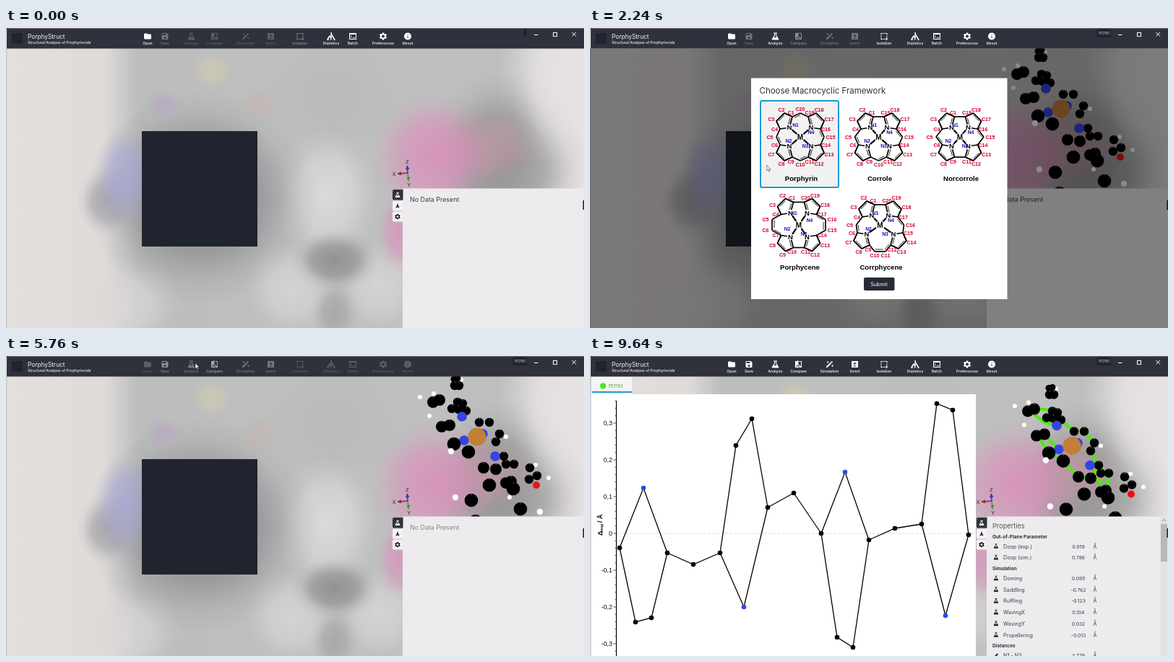
An HTML page with a canvas that plays this animation: 800 px wide and 416 px high, repeating every 9.68 s.

```html
<!DOCTYPE html>
<html lang="en">
<head>
<meta charset="utf-8">
<title>PorphyStruct</title>
<style>
html, body { margin: 0; width: 100%; height: 100%; overflow: hidden; background: #bbb; }
canvas { display: block; }
</style>
</head>
<body>
<canvas id="stage" width="800" height="416"></canvas>
<script>
const ctx = document.getElementById('stage').getContext('2d');
const LOOP = 9680;
const LOADED = 1900, PICKED = 3240, CLOSED = 4680, BUSY = 5640, DONE = 6240;
const UI = 'Inter, sans-serif', ARIAL = '"Liberation Sans", Arial, sans-serif';
const NAVY = '#20242e', BAR = '#2f323c', PANEL = '#edebee', INK = '#3c3d42';

function rect(x, y, w, h, color, radius = 0) {
  ctx.fillStyle = color;
  ctx.beginPath();
  ctx.roundRect(x, y, w, h, radius);
  ctx.fill();
}

function disc(x, y, r, color) {
  ctx.fillStyle = color;
  ctx.beginPath();
  ctx.arc(x, y, r, 0, Math.PI * 2);
  ctx.fill();
}

function line(points, color, width) {
  ctx.strokeStyle = color;
  ctx.lineWidth = width;
  ctx.beginPath();
  points.forEach(([x, y]) => ctx.lineTo(x, y));
  ctx.stroke();
}

function text(str, x, y, size, color, { weight = 400, align = 'left', family = UI } = {}) {
  ctx.font = `${weight} ${size}px ${family}`;
  ctx.textAlign = align;
  ctx.textBaseline = 'alphabetic';
  ctx.fillStyle = color;
  ctx.fillText(str, x, y);
}

// Icons live on a 24-unit grid.
const ICONS = {
  folder: 'M10 4H4L2 6V18L4 20H20L22 18V8L20 6H12Z',
  save: 'M17 3H5L3 5V19L5 21H19L21 19V7ZM12 13A3 3 0 1 0 12 19A3 3 0 1 0 12 13ZM5 5V9H15V5Z',
  flask: 'M7 2H17V4H15V9L22 20L20 22H4L2 20L9 9V4H7ZM11 4V10L8 15H16L13 10V4Z',
  compare: 'M10 3H3V21H10V23H12V1H10ZM10 18H5L10 12ZM14 3H21V21H14V12L19 18V5H14Z',
  wand: 'M2 19L14 7L17 10L5 22ZM15 6L18 3L21 6L18 9ZM7 2L8 5L11 6L8 7L7 10L6 7L3 6L6 5ZM20 12L21 15L24 16L21 17L20 20L19 17L16 16L19 15Z',
  invert: 'M3 3H21V21H3ZM11 6V9H8V11H11V14H13V11H16V9H13V6ZM8 16V18H16V16Z',
  isolate: 'M3 3H8V5H5V8H3ZM10 3H14V5H10ZM16 3H21V8H19V5H16ZM3 10H5V14H3ZM19 10H21V14H19ZM3 16H5V19H8V21H3ZM10 19H14V21H10ZM18 15H20V18H23V20H20V23H18V20H15V18H18Z',
  stats: 'M11 1H14V6L23 20V23H19V20L15 13L13 16V22H10V15L8 14L5 20V23H1V19L7 10H10L11 6ZM12 8L11 12L14 11Z',
  batch: 'M2 3H22V21H2ZM4 7V19H20V7ZM6 9L10 13L6 17L5 16L8 13L5 10ZM12 15H18V17H12Z',
  gear: 'M10 2H14L15 5L17 6L20 5L22 9L20 11V13L22 15L20 19L17 18L15 19L14 22H10L9 19L7 18L4 19L2 15L4 13V11L2 9L4 5L7 6L9 5ZM12 8A4 4 0 1 0 12 16A4 4 0 1 0 12 8Z',
  info: 'M12 2A10 10 0 1 0 12 22A10 10 0 1 0 12 2ZM11 7H13V9H11ZM11 11H13V17H11Z',
  needle: 'M12 2L20 22L12 18L4 22Z',
  pencil: 'M3 18L17 4L21 8L7 22H3Z'
};
for (const key in ICONS) ICONS[key] = new Path2D(ICONS[key]);

function icon(name, x, y, size, color) {
  ctx.save();
  ctx.translate(x - size / 2, y - size / 2);
  ctx.scale(size / 24, size / 24);
  ctx.fillStyle = color;
  ctx.fill(ICONS[name], 'evenodd');
  ctx.restore();
}

// Soft patches: centre, radii, colour.
const BLOBS = [
  [450, 95, 110, 100, '184,186,186'], [445, 232, 72, 95, '224,222,223'],
  [270, 235, 160, 150, '130,129,133'], [142, 240, 45, 50, '160,159,165'],
  [165, 205, 45, 70, '168,168,212'], [285, 58, 30, 28, '207,201,178'],
  [218, 108, 25, 24, '184,170,196'], [350, 108, 30, 25, '194,182,176'],
  [160, 385, 85, 70, '220,217,216'],
  [395, 362, 65, 65, '216,214,215'], [518, 358, 60, 65, '216,214,215'],
  [455, 322, 60, 42, '138,137,138'], [455, 396, 32, 45, '165,164,165'],
  [690, 185, 115, 125, '138,138,138'], [775, 75, 75, 135, '230,227,226'],
  [665, 165, 75, 55, '188,152,164'], [590, 178, 88, 90, '220,142,188'],
  [545, 282, 32, 58, '214,150,188']
];

function backdrop() {
  const base = ctx.createLinearGradient(0, 0, 800, 0);
  [[0, '#e3dfdd'], [.17, '#dfdbd9'], [.23, '#bbbcbc'], [.5, '#bfc0c0'],
   [.85, '#bebebe'], [.92, '#dad8d7'], [1, '#e6e3e2']].forEach(([p, c]) => base.addColorStop(p, c));
  ctx.fillStyle = base;
  ctx.fillRect(0, 0, 800, 416);
  for (const [x, y, rx, ry, rgb] of BLOBS) {
    ctx.save();
    ctx.translate(x, y);
    ctx.scale(rx, ry);
    const g = ctx.createRadialGradient(0, 0, 0, 0, 0, 1);
    g.addColorStop(0, `rgba(${rgb},.85)`);
    g.addColorStop(.5, `rgba(${rgb},.58)`);
    g.addColorStop(.8, `rgba(${rgb},.14)`);
    g.addColorStop(1, `rgba(${rgb},0)`);
    ctx.fillStyle = g;
    ctx.fillRect(-1, -1, 2, 2);
    ctx.restore();
  }
}

const TOOLS = [
  ['Open', 'folder', 196], ['Save', 'save', 220], ['Analyze', 'flask', 256.5],
  ['Compare', 'compare', 288.5], ['Simulation', 'wand', 331.5], ['Invert', 'invert', 366.5],
  ['Isolation', 'isolate', 407], ['Statistics', 'stats', 450], ['Batch', 'batch', 480],
  ['Preferences', 'gear', 522], ['About', 'info', 556]
];

// One digit per tool: its brightness out of nine.
function toolLevels(t) {
  if (t < LOADED) return '93222249999';
  if (t < BUSY) return '93943399999';
  return t < DONE ? '24353322222' : '99999999999';
}

function titleBar(t) {
  rect(0, 0, 800, 1, '#777074');
  rect(1, 1, 799, 27.5, BAR);
  rect(8, 7, 15, 15, NAVY);
  text('PorphyStruct', 30, 15, 8.3, '#f4f4f6');
  text('Structural Analysis of Porphyrinoids', 30, 21.5, 5.1, '#f4f4f6', { weight: 500 });
  const levels = toolLevels(t);
  TOOLS.forEach(([label, name, x], i) => {
    ctx.globalAlpha = levels[i] / 9;
    icon(name, x, 11.5, 12, '#fff');
    text(label, x, 22.5, 5.2, '#fff', { weight: 500, align: 'center' });
  });
  ctx.globalAlpha = 1;
  if (t < LOADED) rect(716, 1, 5, 11, NAVY);
  else {
    rect(701, 1, 20, 12, NAVY, 1);
    text('751761', 711, 9.2, 5, '#e4e4e8', { align: 'center' });
  }
  line([[731, 9.5], [736.5, 9.5]], '#fff', 1);
  ctx.strokeRect(757.5, 6.5, 5, 5);
  line([[783.5, 6], [789, 11.5]], '#fff', 1);
  line([[789, 6], [783.5, 11.5]], '#fff', 1);
}

function axes() {
  const arm = (x, y, color) => {
    line([[556, 201], [x, y]], color, 1.5);
    ctx.save();
    ctx.translate(x, y);
    ctx.rotate(Math.atan2(y - 201, x - 556));
    ctx.fillStyle = color;
    ctx.beginPath();
    ctx.moveTo(3, 0); ctx.lineTo(-3, -2.6); ctx.lineTo(-3, 2.6);
    ctx.fill();
    ctx.restore();
  };
  arm(544, 202, '#7d3030');
  arm(557, 210, '#38a038');
  arm(555.5, 193, '#2838b8');
  const label = (s, x, y) => text(s, x, y, 7, '#222', { align: 'center', family: ARIAL });
  label('Z', 555.5, 188);
  label('X', 537, 205);
  label('Y', 557.5, 220);
}

// Atom groups: colour, radius, positions.
const ATOMS = [
  ['#fff', 3, [[573, 57], [586, 83], [592, 52], [692, 112], [733, 151], [751, 169], [697, 196], [630, 33]]],
  ['#000', 4.5, [[620, 32], [625, 31]]],
  ['#000', 6.2, [[621, 41], [627, 41], [625, 64], [632, 66], [617, 73], [626, 74], [637, 76], [655, 92],
    [669, 92], [683, 108], [678, 119], [689, 139], [692, 150], [703, 150], [725, 155], [735, 166], [724, 171]]],
  ['#3345e4', 6.8, [[631, 84], [660, 108], [634, 117], [677, 139]]],
  ['#000', 8, [[600, 61], [591, 64], [603, 98], [614, 96], [661, 155], [678, 157], [692, 176], [699, 174]]],
  ['#c47f36', 12.5, [[652, 112]]],
  ['#000', 9.3, [[620, 122], [640, 133], [669, 179], [702, 184], [644, 200], [650, 229], [712, 212]]],
  ['#ee1014', 5, [[734, 179]]],
  ['#fff', 4.2, [[616, 132], [622, 196], [739, 216]]]
];
const RING = [
  [[594, 62], [602, 60], [625, 63]], [[597, 66], [613, 79], [625, 83]], [[634, 76], [655, 90], [669, 92], [683, 109],
   [678, 120], [689, 139], [703, 153], [700, 172]], [[604, 96], [619, 121], [640, 133], [661, 155], [689, 159], [702, 184]],
  [[614, 96], [633, 117]], [[689, 139], [678, 157]]
];

function molecule(analyzed) {
  ctx.save();
  if (analyzed) ctx.translate(15, 12.5);
  const metal = [652, 112];
  ATOMS[3][2].forEach(n => line([metal, n], '#b8aaa0', .8));
  if (analyzed) RING.forEach(path => line(path, '#48ee08', 4));
  for (const [color, r, spots] of ATOMS) {
    for (const [x, y] of spots) {
      disc(x, y, r, color);
      if (color === '#000' && r > 6) line([[x, y - r], [x + .5, y - r + 2.5]], '#999', .6);
    }
  }
  ctx.restore();
}

const SECTIONS = [
  [253, 'Out-of-Plane Parameter', ['Doop (exp.)', '0.919', 'Doop (sim.)', '0.786'], 266.5],
  [297, 'Simulation', ['Doming', '0.095', 'Saddling', '-0.762', 'Ruffling', '-0.123', 'WavingX', '0.104',
    'WavingY', '0.032', 'Propellering', '-0.013'], 311],
  [404, 'Distances', ['N1 - N3', '3.779'], 418]
];

function sidePanel(t) {
  rect(549, 222.5, 251, 200, PANEL, 3);
  rect(535, 224, 14.5, 14.5, '#30333d', [2, 0, 0, 2]);
  rect(535, 239.5, 14, 14, '#f4f3f5', [2, 0, 0, 2]);
  rect(535, 254.5, 14, 14, '#f4f3f5', [2, 0, 0, 2]);
  icon('flask', 542, 231.5, 8.5, '#fff');
  icon('needle', 542, 246.5, 8, '#222');
  icon('gear', 542, 261.5, 9, '#222');
  if (t < DONE) {
    text('No Data Present', 559, 241.3, 8.9, t < BUSY ? INK : '#85858a');
    return;
  }
  text('Properties', 557, 239, 9.2, '#55565b');
  for (const [y, title, rows, first] of SECTIONS) {
    text(title, 557, y, 6.5, '#2c2d31', { weight: 700 });
    for (let i = 0; i < rows.length; i += 2) {
      const base = first + i * 7.85;
      icon(rows[i][0] === 'N' ? 'pencil' : 'flask', 562, base - 3, 8, '#222');
      text(rows[i], 572, base, 7.2, INK);
      text(rows[i + 1], 676, base, 6.8, INK, { align: 'center' });
      text('Å', 696.5, base, 7, INK);
    }
  }
  rect(789.5, 223, 10, 193, '#e2e1e4');
  rect(790, 233, 9, 52, '#b8b7ba');
  line([[792, 229], [794.5, 226.5], [797, 229]], '#777', 1);
}

// Each ring: shared ends, the black outer pair and the blue nitrogen.
const CURVE = [
  { from: [41, 266], pair: [[63, 369], [85, 363]], n: [74, 183], to: [107, 273], meso: [143, 289] },
  { from: [180, 273], pair: [[202, 124], [224, 87]], n: [213, 348], to: [246, 210], meso: [282, 190] },
  { from: [320, 246], pair: [[342, 390], [364, 404]], n: [353, 161], to: [386, 255], meso: [422, 239] },
  { from: [459, 233], pair: [[480, 66], [502, 75]], n: [492, 360], to: [524, 248] }
];

function chart() {
  rect(1, 53, 533, 363, '#fff');
  rect(2, 29, 56, 24, '#f4f4f4');
  rect(3, 49, 55, 2, '#2196c8');
  disc(18, 41.5, 4, '#44e818');
  text('751761', 25, 44, 6.5, '#569548');
  ctx.setLineDash([4, 2]);
  line([[37, 246], [534, 246]], '#dcdcdc', 1);
  ctx.setLineDash([]);
  line([[36.5, 62], [36.5, 416]], '#000', 1.2);
  for (let i = -16; i <= 18; i++) {
    const y = 246 - i * 10.2;
    line([[i % 5 ? 34.5 : 32.5, y], [36.5, y]], '#222', .8);
    if (i % 5 === 0) {
      const label = i ? (i / 50).toFixed(1).replace('.', ',') : '0';
      text(label, 31, y + 3, 9, '#111', { align: 'right', family: ARIAL });
    }
  }
  ctx.save();
  ctx.translate(16.5, 249);
  ctx.rotate(-Math.PI / 2);
  text('Δ', 0, 0, 9, '#000', { weight: 700, family: ARIAL });
  text('msp', 6, 1.5, 5, '#000', { weight: 700, family: ARIAL });
  text('/ Å', 18, 0, 9, '#000', { weight: 700, family: ARIAL });
  ctx.restore();
  CURVE.forEach(({ from, pair, n, to, meso }, i) => {
    line([from, ...pair, to], '#000', 1.3);
    line([from, n, to], '#000', 1.3);
    if (meso) line([to, meso, CURVE[i + 1].from], '#000', 1.3);
  });
  for (const { from, pair, n, to, meso } of CURVE) {
    [from, ...pair, to, meso].forEach(p => p && disc(p[0], p[1], 3.3, '#000'));
    disc(n[0], n[1], 3.3, '#3048e0');
  }
}

// Bridges count the carbons between rings: top, left, bottom, right.
const FRAMEWORKS = [
  { name: 'Porphyrin', x: 291, y: 151, bridges: [1, 1, 1, 1] },
  { name: 'Corrole', x: 399.5, y: 151, bridges: [0, 1, 1, 1] },
  { name: 'Norcorrole', x: 512, y: 151, bridges: [0, 1, 0, 1], skip: 10 },
  { name: 'Porphycene', x: 289, y: 273, bridges: [0, 2, 0, 2] },
  { name: 'Corrphycene', x: 401.5, y: 273, bridges: [0, 1, 2, 1] }
];
const SIDES = [[0, -1], [-1, 0], [0, 1], [1, 0]];
const CORNERS = [[-1, -1], [-1, 1], [1, 1], [1, -1]];
const RING_ATOMS = [[11, 28], [22, 33], [33, 22], [28, 11]];
const LABEL_SHIFT = [[2, 6], [4, 4.5], [7, 2.5], [7.5, 0]];
const N_LABELS = [[-6.5, -16], [-16, 6], [7, 13], [15, -6]];

function label(str, x, y, size, color) {
  text(str, x, y + size * .36, size, color, { weight: 700, align: 'center', family: ARIAL });
}

function innerBond(a, b, c) {
  const shrink = p => [p[0] + (c[0] - p[0]) * .27, p[1] + (c[1] - p[1]) * .27];
  line([shrink(a), shrink(b)], '#111', .9);
}

function framework({ name, x, y, bridges, skip }, fill) {
  ctx.save();
  ctx.translate(x, y);
  ctx.lineJoin = 'round';
  const marks = [], outline = [], nitrogens = [];
  const shift = count => (count - 1) * 3.5;
  let number = 1;
  const mark = (px, py) => {
    if (number === skip) number++;
    marks.push(['C' + number++, px, py]);
  };
  CORNERS.forEach(([sx, sy], q) => {
    const odd = q % 2;
    const dx = shift(bridges[q === 2 || q === 1 ? 2 : 0]);
    const dy = shift(bridges[q < 2 ? 1 : 3]);
    const place = ([a, b]) => [sx * (a + dx), sy * (b + dy)];
    const local = RING_ATOMS.map(place);
    const atoms = odd ? local.slice().reverse() : local;
    const n = place([15, 13]), mid = place([22, 22]);
    line([...atoms, n, atoms[0]], '#000', 1.7);
    innerBond(atoms[1], atoms[2], mid);
    innerBond(odd ? atoms[3] : atoms[0], n, mid);
    line([[n[0] * .3, n[1] * .3], n], '#000', 2.2);
    nitrogens.push(n);
    atoms.forEach(([px, py], i) => {
      const [lx, ly] = LABEL_SHIFT[odd ? 3 - i : i];
      mark(px + sx * lx, py + sy * ly);
    });
    outline.push(atoms);
    const [ux, uy] = SIDES[(q + 1) % 4];
    const count = bridges[(q + 1) % 4];
    for (let k = 0; k < count; k++) {
      const along = count === 2 ? (k ? 7.5 : -7.5) : 0;
      const px = ux * (count === 2 ? 37 : 33) + uy * along;
      const py = uy * (count === 2 ? 37 : 33) - ux * along;
      outline.push([[px, py]]);
      mark(px + ux * 9, py + uy * 5.5);
    }
  });
  const path = outline.flat();
  for (let i = 0; i < path.length; i++) {
    line([path[i], path[(i + 1) % path.length]], '#000', 1.7);
  }
  outline.forEach((part, i) => {
    if (part.length > 1) return;
    const next = outline[(i + 1) % outline.length][0];
    innerBond(part[0], next, [part[0][0] * .7, part[0][1] * .7]);
  });
  disc(0, 0, 6, fill);
  label('M', 0, 0, 10, '#000');
  nitrogens.forEach(([px, py], i) => {
    disc(px, py, 4.6, fill);
    label('N', px, py, 9.5, '#000');
    label('N' + (i + 1), ...N_LABELS[i], 6.8, '#1810b4');
  });
  marks.forEach(([s, px, py]) => label(s, px, py, 7.2, '#d2002d'));
  ctx.restore();
  label(name, x + 1.5, y < 200 ? 209 : 332, 9.6, '#000');
}

function dialog(t) {
  rect(0, 28.5, 800, 388, 'rgba(0,0,0,.46)');
  rect(223, 69.5, 354.5, 306.5, '#fff');
  text('Choose Macrocyclic Framework', 234.5, 91, 11.5, '#303136');
  const picked = t < PICKED ? 0 : 1;
  rect(235 + picked * 110.5, 100, 110, 122, '#1b9bd0', 3);
  rect(237 + picked * 110.5, 102, 106, 118, '#f1f1f2', 1);
  FRAMEWORKS.forEach((item, i) => framework(item, i === picked ? '#f1f1f2' : '#fff'));
  rect(379, 346, 42.5, 18, t > 4300 ? '#555861' : '#262a35', 2);
  text('Submit', 400, 357.8, 7.2, '#fff', { align: 'center' });
}

const POINTER = [
  [1760, 211, 193], [1960, 211, 193], [3080, 425, 175], [3280, 425, 175],
  [4400, 410, 357], [4640, 410, 357], [5520, 262, 10], [8500, 262, 10]
];
const ARROW = new Path2D('M0 0V7.5L1.8 6L3 8.8L4.2 8.2L3 5.5H5.4Z');

function pointer(t) {
  const next = POINTER.findIndex(key => key[0] > t);
  if (next < 1) return;
  const [t0, x0, y0] = POINTER[next - 1], [t1, x1, y1] = POINTER[next];
  const u = (t - t0) / (t1 - t0), ease = u * u * (3 - 2 * u);
  ctx.save();
  ctx.translate(x0 + (x1 - x0) * ease, y0 + (y1 - y0) * ease);
  ctx.fillStyle = '#fff';
  ctx.strokeStyle = '#333';
  ctx.lineWidth = .6;
  ctx.fill(ARROW);
  ctx.stroke(ARROW);
  ctx.restore();
}

function draw(t) {
  backdrop();
  axes();
  if (t >= LOADED) molecule(t >= DONE);
  if (t < DONE) rect(188, 143, 160, 160, NAVY);
  else chart();
  sidePanel(t);
  rect(0, 28, 1.5, 388, '#cfc6c6');
  rect(798.5, 239, 1.5, 13, '#222');
  if (t >= LOADED && t < CLOSED) dialog(t);
  titleBar(t);
  pointer(t);
}

const start = performance.now();
function tick() {
  draw((performance.now() - start) % LOOP);
  requestAnimationFrame(tick);
}
tick();
</script>
</body>
</html>
```
